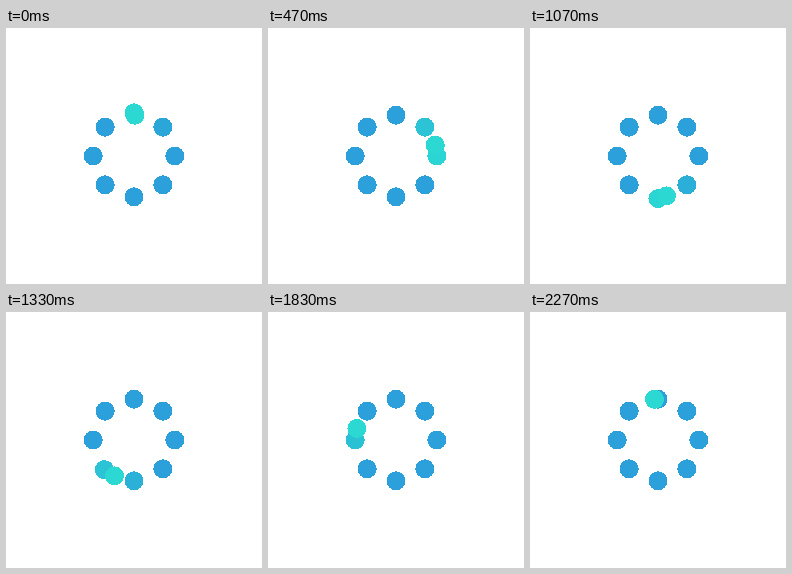
Recreate the animation shown at these times as an HTML page. Size 256 by 256 pixels, loop 2.31 s.

```html
<!DOCTYPE html>
<html lang="en">
<head>
<meta charset="utf-8">
<title>Loader</title>
<style>
  html, body { margin: 0; width: 100%; height: 100%; overflow: hidden; background: #fff; }
  svg { display: block; }
</style>
</head>
<body>
<svg id="stage" width="256" height="256" viewBox="-128 -128 256 256" shape-rendering="crispEdges"></svg>
<script>
const stage = document.getElementById('stage');
const LOOP = 2310, COUNT = 8, ORBIT = 40.8, DOT = 9.5;
const PUSH = 5, PUSH_SPAN = 115;
const BLUE = [43, 160, 218], CYAN = [43, 217, 210];

const clamp = v => Math.max(0, Math.min(1, v));
const mix = k => `rgb(${BLUE.map((c, i) => Math.round(c + (CYAN[i] - c) * k))})`;

// 1 at the peak time, falling evenly to 0 over the span on both sides.
const pulse = (t, peak, span) => clamp(1 - Math.abs(t - peak) / span);

function addDot() {
  const dot = document.createElementNS('http://www.w3.org/2000/svg', 'circle');
  dot.setAttribute('r', DOT);
  return stage.appendChild(dot);
}

function place(dot, turn, radius, glow) {
  const a = turn * 2 * Math.PI;
  dot.setAttribute('cx', radius * Math.sin(a));
  dot.setAttribute('cy', -radius * Math.cos(a));
  dot.setAttribute('fill', mix(glow));
}

const ring = Array.from({ length: COUNT }, addDot);
const runner = addDot();

function draw(now) {
  const t = now % LOOP;
  ring.forEach((dot, i) => {
    // The runner reaches each dot in turn; later dots glow more briefly.
    const glow = clamp(1.5 * pulse(t, i * LOOP / COUNT, 340 - 30 * i));
    const push = PUSH * Math.sin(Math.PI / 2 * pulse(t, 80 + 270 * i, PUSH_SPAN));
    place(dot, i / COUNT, ORBIT + push, glow);
  });
  place(runner, t / LOOP + 0.003, ORBIT, 1);
}

const began = performance.now();
function tick() {
  draw(performance.now() - began);
  requestAnimationFrame(tick);
}
tick();
</script>
</body>
</html>
```
